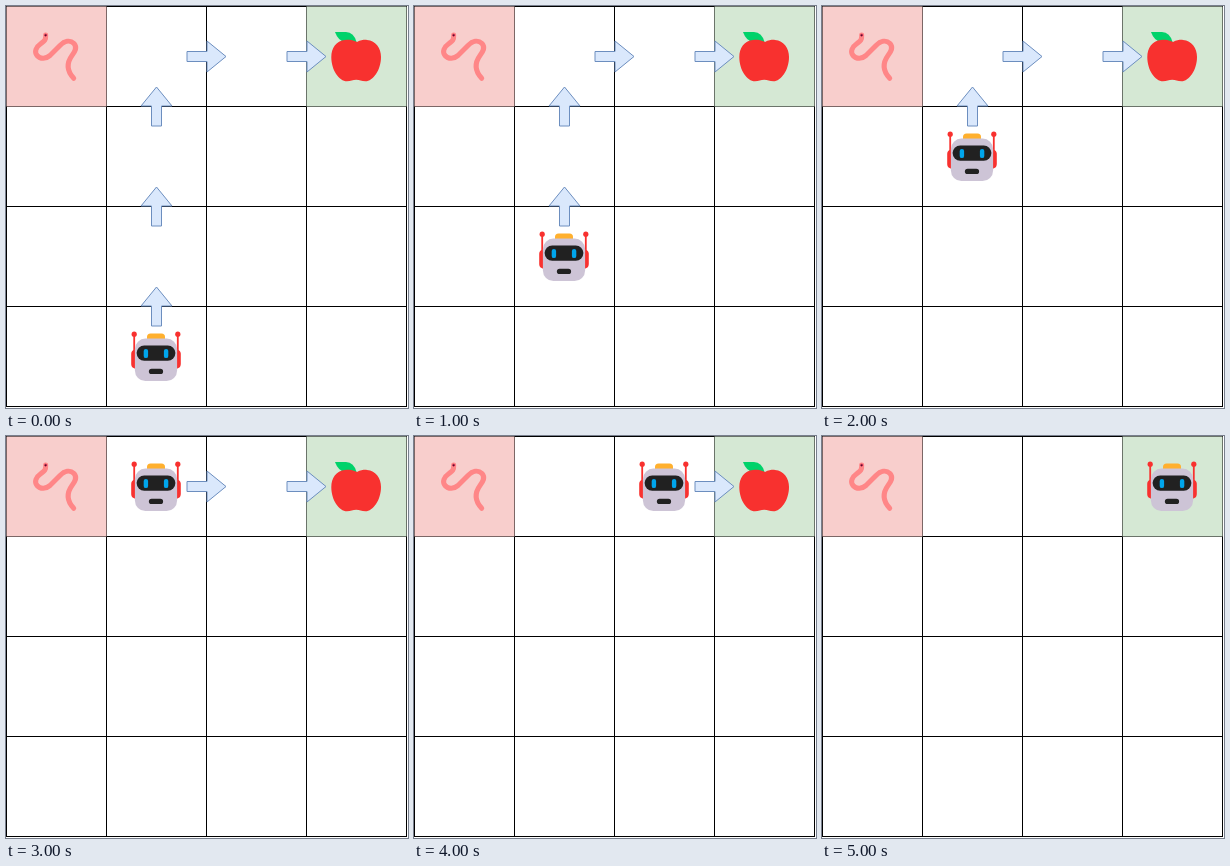
An HTML page for the animation above (6000 ms loop, 402 by 402 pixels).

```html
<!DOCTYPE html>
<html lang="en">
<head>
<meta charset="utf-8">
<title>Robot grid path</title>
<style>
  html, body { margin: 0; width: 100%; height: 100%; overflow: hidden; background: #fff; }
  svg { display: block; width: 402px; height: 402px; }
</style>
</head>
<body>
<svg viewBox="0 0 402 402">
  <defs>
    <path id="arrow" d="M0-5H20V-15.5L39 0L20 15.5V5H0Z" fill="#dae8fc" stroke="#6c8ebf" stroke-miterlimit="10"/>
    <g id="side">
      <path d="M5 18.5H3.5Q.2 19.5 .2 23V33Q.2 36.5 3.5 37.5H5Z" fill="#f8312f"/>
      <path d="M3.2 3V20" stroke="#f8312f" stroke-width="1.8"/>
      <circle cx="3.2" cy="3.2" r="2.6" fill="#f8312f"/>
    </g>
  </defs>

  <path id="grid" fill="none" stroke="#000"/>
  <rect x=".5" y=".5" width="100" height="100" fill="#f8cecc"/>
  <rect x="300.5" y=".5" width="100" height="100" fill="#d5e8d4"/>

  <g id="worm" fill="none" stroke="#ff8687" stroke-linecap="round">
    <path stroke-width="5" d="M39.7 29C40 34 38.5 35 35 37.5C30 41 28 45.5 31 49.5C34.5 53.5 40 53 44 49.5L54 39.5C58.500 35 64 33.500 68 37.500C71.500 41.500 69 45.500 66 49.500C60.500 57 60.500 64.500 67.700 72.300"/>
    <circle cx="39.600" cy="29.200" r="1" fill="#212121" stroke="#ca0b4a" stroke-width=".6"/>
  </g>

  <g id="apple">
    <path fill="#00d26a" d="M329 26H340Q348 26.500 350.500 36L340 36.500Q332 35 329 26Z"/>
    <path fill="#f8312f" d="M351 36C355 34 358 33.700 361 33.900C370 34.800 375 42 375 51C375 64 367 75.300 359.500 75.300C355.500 75.300 353.500 73.800 350.200 73.800C347 73.800 344.500 75.300 341 75.300C333 75.300 325.300 64 325.300 51C325.300 42 330 34.800 339 33.900C343 33.600 347 34 351 36Z"/>
  </g>

  <g id="arrows"></g>

  <g id="robot">
    <use href="#side"/>
    <use href="#side" transform="matrix(-1 0 0 1 50 0)"/>
    <path fill="#ffb02e" d="M16 8.500V6Q16 2.500 19.500 2.500H30.500Q34 2.500 34 6V8.500Z"/>
    <rect x="3.900" y="7.600" width="42.200" height="42.400" rx="10.500" fill="#cdc4d6"/>
    <rect x="5.600" y="14.500" width="38.800" height="15.200" rx="7.600" fill="#212121"/>
    <rect x="12.700" y="17.900" width="4.400" height="9.200" rx="2.200" fill="#00a6ed"/>
    <rect x="32.900" y="17.900" width="4.400" height="9.200" rx="2.200" fill="#00a6ed"/>
    <rect x="17.900" y="37.700" width="14.200" height="5.400" rx="2.700" fill="#212121"/>
  </g>
</svg>
<script>
  const CELL = 100, STEP_MS = 1000;
  const route = [[1, 3], [1, 2], [1, 1], [1, 0], [2, 0], [3, 0]];
  const byId = id => document.getElementById(id);
  const center = n => n * CELL + 50.5;

  byId("grid").setAttribute("d", [0, 1, 2, 3, 4].map(i => {
    const p = i * CELL + 0.5;
    return `M0 ${p}H401M${p} 0V401`;
  }).join(""));

  // Each arrow straddles the border between two consecutive cells.
  byId("arrows").innerHTML = route.slice(1).map(([col, row], i) => {
    const [fromCol, fromRow] = route[i];
    const dx = col - fromCol, dy = row - fromRow;
    const x = center(fromCol) + dx * 30.5, y = center(fromRow) + dy * 30.5;
    return `<use href="#arrow" transform="translate(${x} ${y}) rotate(${dy * 90})"/>`;
  }).join("");
  const arrows = [...byId("arrows").children];

  const show = (el, visible) => el.setAttribute("visibility", visible ? "visible" : "hidden");
  const start = performance.now();

  function draw(now) {
    const step = Math.floor(Math.max(0, now - start) / STEP_MS) % route.length;
    const [col, row] = route[step];
    byId("robot").setAttribute("transform", `translate(${col * CELL + 25} ${row * CELL + 25})`);
    arrows.forEach((arrow, i) => show(arrow, i >= step));
    show(byId("apple"), step < route.length - 1);
    requestAnimationFrame(draw);
  }
  draw(start);
</script>
</body>
</html>
```
